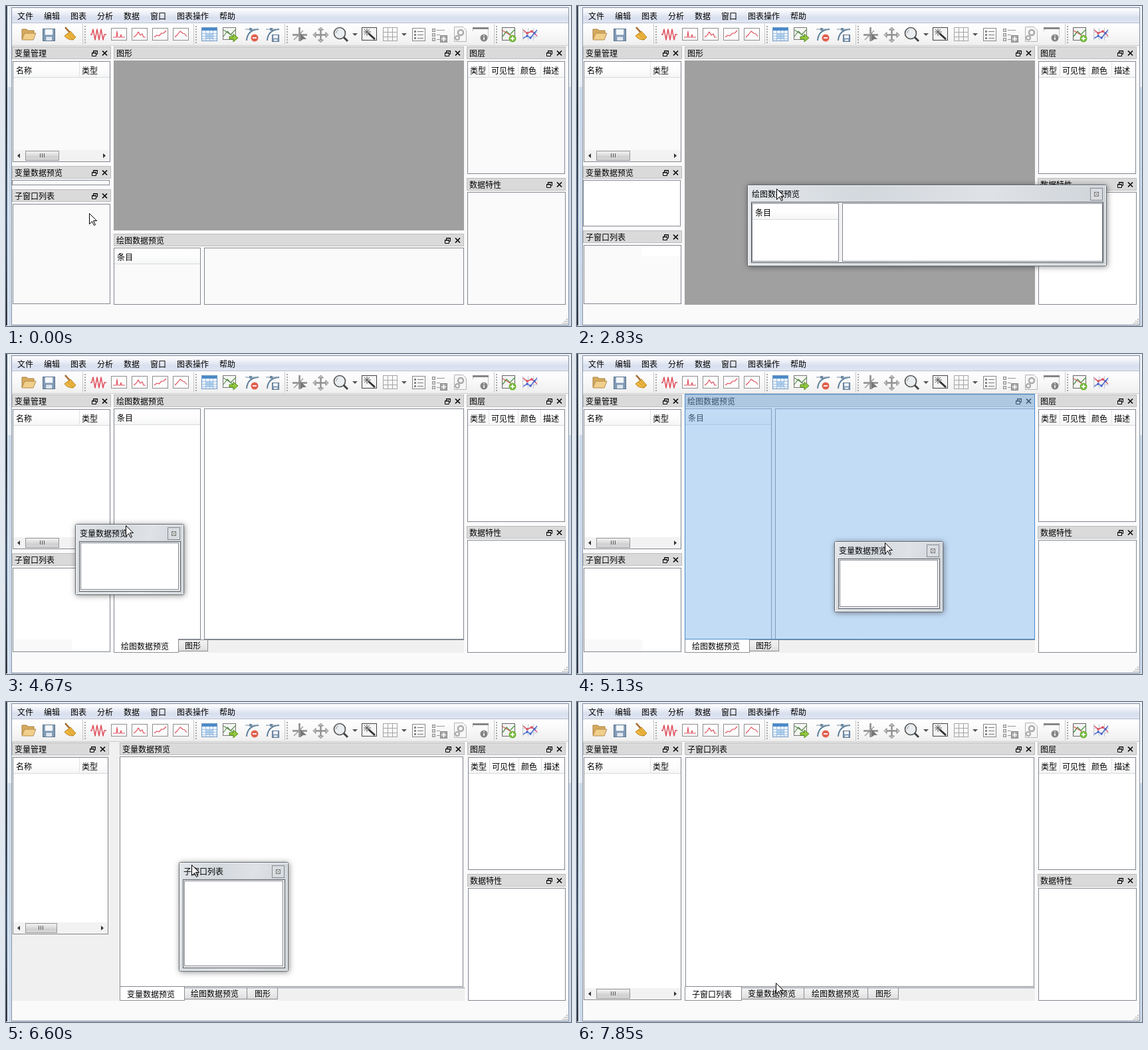
An HTML page with a canvas that plays this animation: 850 by 482 pixels, repeating every 8000 ms.

```html
<!DOCTYPE html>
<html lang="zh">
<head>
<meta charset="utf-8">
<style>
html, body { margin: 0; width: 100%; height: 100%; overflow: hidden; background: #fafafa; }
canvas { display: block; width: 850px; height: 482px; }
</style>
</head>
<body>
<canvas id="stage" width="850" height="482"></canvas>
<script>
const ctx = document.getElementById('stage').getContext('2d');
const LOOP = 8000;
const EDGE = '#828790', PALE = '#fafafa', WHITE = '#fff';
const PLOT = '图形', ITEMS = '绘图数据预览', VARS = '变量数据预览', SUBS = '子窗口列表';

// Pointer positions: time, x, y; each one holds until the next.
const pointer = [
  [0, 125, 312], [120, 124, 308], [260, 115, 300], [400, 104, 290], [530, 94, 282], [670, 86, 276],
  [800, 82, 273], [940, 83, 272], [1240, 83, 276], [1380, 83, 290], [1520, 83, 306], [1650, 84, 322],
  [1790, 84, 334], [1930, 130, 350], [2070, 269, 373], [2210, 220, 373], [2370, 206, 349],
  [2680, 225, 330], [2830, 300, 275], [2980, 355, 228], [3910, 300, 232], [4060, 220, 238],
  [4210, 150, 244], [4370, 105, 247], [4520, 89, 247], [4670, 180, 258], [4820, 310, 270],
  [4980, 410, 280], [5130, 463, 284], [5550, 350, 308], [5670, 216, 333], [5820, 110, 326],
  [5940, 50, 318], [6060, 21, 312], [6200, 24, 309], [6330, 28, 305], [6480, 150, 275],
  [6600, 279, 245], [6750, 330, 235], [7450, 325, 300], [7580, 315, 360], [7720, 305, 405], [7850, 299, 423]
];

const within = (t, from, to) => t >= from && t < to;

function rect(x0, y0, x1, y1, fill) {
  ctx.fillStyle = fill;
  ctx.fillRect(x0, y0, x1 - x0, y1 - y0);
}

function box(x0, y0, x1, y1, fill = WHITE, edge = EDGE) {
  rect(x0, y0, x1, y1, edge);
  rect(x0 + 1, y0 + 1, x1 - 1, y1 - 1, fill);
}

function shade(y0, y1, ...colors) {
  const g = ctx.createLinearGradient(0, y0, 0, y1);
  colors.forEach((c, i) => g.addColorStop(i / (colors.length - 1), c));
  return g;
}

function path(d, stroke, width = 1, fill) {
  const p = new Path2D(d);
  if (fill) { ctx.fillStyle = fill; ctx.fill(p); }
  if (stroke) {
    ctx.strokeStyle = stroke;
    ctx.lineWidth = width;
    ctx.lineJoin = 'round';
    ctx.stroke(p);
  }
}

function disc(x, y, r, fill, stroke, width = 1) {
  ctx.beginPath();
  ctx.arc(x, y, r, 0, 7);
  if (fill) { ctx.fillStyle = fill; ctx.fill(); }
  if (stroke) { ctx.strokeStyle = stroke; ctx.lineWidth = width; ctx.stroke(); }
}

function label(text, x, y, color = '#000') {
  ctx.font = '12px "Noto Sans CJK SC", "Noto Sans CJK", sans-serif';
  ctx.textBaseline = 'alphabetic';
  ctx.fillStyle = color;
  ctx.fillText(text, x, y + 4.5);
}

function title(text, x0, y0, x1) {
  box(x0, y0, x1, y0 + 19, '#dadada', '#bcbcbc');
  label(text, x0 + 4, y0 + 10);
  const x = x1 - 29, y = y0 + 6;
  path(`M${x + 2.5} ${y + 3}v-2.5h6v5h-2M${x + 2} ${y + 1}h7M${x + .5} ${y + 3.5}h6v5h-6zM${x} ${y + 4}h7`, '#000');
  path(`M${x1 - 13} ${y + .5}l7 7m0 -7l-7 7`, '#000', 1.6);
}

function header(x0, y0, x1, columns) {
  rect(x0, y0, x1, y0 + 24, shade(y0, y0 + 24, WHITE, '#fdfdfd', '#f4f5f6'));
  rect(x0, y0 + 23, x1, y0 + 24, '#d9dadb');
  columns.forEach(([text, x], i) => {
    label(text, x, y0 + 13);
    if (i) rect(x - 4, y0, x - 3, y0 + 24, '#e1e2e4');
  });
}

function chrome() {
  rect(0, 0, 850, 482, PALE);
  rect(0, 0, 2, 482, shade(0, 482, '#39495b', '#22313f', '#3e5878', '#28333f'));
  rect(2, 0, 8, 122, '#e9eff7');
  rect(2, 122, 8, 482, '#cddbeb');
  rect(2, 0, 3, 482, '#fff');
  rect(847, 0, 850, 122, '#eef3f9');
  rect(847, 122, 850, 482, '#cddbeb');
  rect(8, 2, 9, 481, '#8794a3');
  rect(846, 2, 847, 481, '#8794a3');
  rect(8, 0, 847, 2, '#e9eff7');
  rect(8, 2, 847, 3, '#7e8a98');
  rect(8, 480, 847, 481, '#7e8a98');
  rect(0, 481, 850, 482, '#cddbeb');
  rect(9, 3, 846, 25, shade(3, 25, '#fff', '#eef1f8', '#d8dfee', '#dfe5f2'));
  rect(9, 25, 846, 26, '#b9c0cf');
  [['文件', 17], ['编辑', 57], ['图表', 97], ['分析', 137], ['数据', 177], ['窗口', 217], ['图表操作', 257], ['帮助', 321]]
    .forEach(([text, x]) => label(text, x, 15));
  rect(9, 26, 846, 59, shade(26, 59, '#fff', '#f8f8f8', '#efefef'));
  rect(9, 59, 846, 60, '#c9c9c9');
  for (let i = 0; i < 3; i++)
    for (let j = 0; j <= i; j++) rect(843 - j * 3, 471 + i * 3, 845 - j * 3, 473 + i * 3, '#bdbdbd');
}

function chartIcon(x, line) {
  box(x, 34, x + 24, 53, '#fdfdfd', '#8f8f8f');
  path(`M${x + 3} 48${line}`, '#e0525e', 1.2);
}

function floppy(x, y, s) {
  box(x, y, x + s, y + s, '#7f99b5', '#5a738e');
  rect(x + s * .2, y + 1, x + s * .8, y + s * .5, '#f5f8fb');
  rect(x + s * .28, y + s * .65, x + s * .75, y + s - 1, '#dfe6ed');
}

function badge(x, y, color, plus) {
  disc(x, y, 5.5, color);
  path(`M${x - 3} ${y}h6` + (plus ? `M${x} ${y - 3}v6` : ''), '#fff', 1.8);
}

function toolbar() {
  [115, 282, 419, 734].forEach(x => {
    rect(x, 27, x + 1, 58, '#c8c8c8');
    for (let y = 30; y < 56; y += 4) rect(x + 3, y, x + 5, y + 2, '#a7a7a7');
  });
  ctx.save();
  ctx.translate(0, -1);
  // Files
  path('M24 51V36h7l2 2h9v4', '#a98140', 1, '#d6aa5d');
  path('M24 52l4-10h17l-4 10z', '#b58c4a', 1, '#f0cf8c');
  floppy(55, 35, 19);
  path('M89 33l7 8', '#a3682c', 2.5);
  path('M88 46l9-7 8 9-4 4q-9 0-13-6z', '#b5801f', 1, '#efb840');
  path('M92 43l9 8M95 41l8 8', '#c9902b');
  // Charts
  path('M127 44h2l2-8 3 16 3-16 3 16 3-16 3 16 2-8h3', '#e04a58', 1.4);
  chartIcon(158, 'h5l1-9 1 9h4l1-4 1 4h5');
  chartIcon(189, 'l4-3 3-5 3 5 3-2 2 5h3');
  chartIcon(220, 'l4-3 3 1 4-4 3 0 4-4');
  chartIcon(251, 'l4-4 4-5 4 3 3 1 3 4');
  // Data
  box(294, 33, 318, 54, '#eef5fc', '#6d96c2');
  rect(295, 34, 317, 38, '#4b8ac8');
  rect(301, 43, 312, 50, '#b1d0ee');
  path('M295 42.5h22M295 46.5h22M295 50.5h22M300.5 38v15M306.5 38v15M311.5 38v15', '#9dbfe0');
  box(326, 33, 346, 52, '#f4f6f2', '#777');
  path('M327 47l6-8 5 5 8-8M327 37l8 5 10 7', '#5c8a51', 1.2);
  path('M336 47h6v-4l7 6-7 6v-4h-6z', '#558b1d', 1, '#92c83e');
  [360, 391].forEach(x => {
    path(`M${x + 2} 53q1-16 18-17`, '#5d7f9b', 2);
    path(`M${x} 36h18`, '#93a7b7', 1.3);
    rect(x + 6, 34, x + 10, 38, '#6f8ba2');
  });
  badge(374, 49, '#e2604e');
  floppy(400, 44, 11);
  // Plot tools
  path('M441.5 33v21M431 44.5h22', '#8b8b8b', 2.5);
  path('M433 52l14-14', '#999', 1.5);
  path('M443 42l9 9-5 0-4 3z', null, 0, '#777');
  path('M473.5 36v16M465 44.5h17', '#929292', 2.5);
  path('M473.5 33l4 4h-8zM473.5 56l4-4h-8zM462 44.5l4-4v8zM485 44.5l-4-4v8z', '#858585', 1, '#c5c5c5');
  disc(502, 42, 8.5, '#e9edef', '#555', 1.7);
  path('M508 48l6 6', '#444', 3);
  path('M500 37q-3 1-3 5', '#aaa', 1.3);
  [525, 599].forEach(x => path(`M${x - 4} 42h8l-4 4z`, null, 0, '#555'));
  box(535, 33, 558, 53, '#f4f4f4', '#444');
  path('M545 42l10 9', '#333', 3);
  path('M543 35v11M538 40h11M539 36l8 8M547 36l-8 8', '#555');
  path('M567.5 33v21M574.5 33v21M581.5 33v21M588.5 33v21M567 33.5h22M567 40.5h22M567 47.5h22M567 53.5h22', '#a5a5a5');
  box(611, 34, 631, 54, '#fafafa', '#888');
  [39, 44, 49].forEach(y => {
    rect(614, y - 1, 617, y + 2, '#888');
    rect(619, y, 628, y + 1, '#777');
  });
  [35, 42, 49].forEach((y, i) => {
    box(641, y, 646, y + 5, '#ddd', '#8d8d8d');
    rect(648, y + 2, i ? 653 : 660, y + 3, '#999');
  });
  box(653, 45, 664, 56, '#a5a5a5', '#898989');
  path('M655 50.5h7M658.5 47v7', '#fff', 1.6);
  path('M674.5 32.5h13l5 5v17h-18z', '#b4b4b4', 1, '#f6f6f6');
  disc(684, 41, 4, null, '#aaa', 2.5);
  disc(679, 49, 3, null, '#aaa', 2);
  rect(702, 33, 726, 36, '#858585');
  path('M702.5 36v3M725.5 36v12', '#c4c4c4');
  disc(719, 49, 5.5, '#858585');
  path('M719 48v4M719 45v1.5', '#fff', 1.6);
  box(746, 33, 766, 53, '#f4f4f4', '#666');
  path('M747 47l6-8 5 5 8-8', '#4f9546', 1.3);
  path('M747 38l7 4 11 7', '#d05b55', 1.2);
  badge(762, 50, '#74b63b', true);
  path('M777.5 34v19M777 40.5h23M777 47.5h23M785.5 34v19M793.5 34v19', '#c4c8d2');
  path('M778 50l6-4 5 3 10-12', '#4868d0', 1.4);
  path('M778 37l6 5 7-3 8 7', '#d94e5e', 1.4);
  [[784, 46], [789, 49], [795, 42]].forEach(([x, y]) => disc(x, y, 1.8, '#4868d0'));
  [[784, 42], [791, 39]].forEach(([x, y]) => disc(x, y, 1.8, '#d94e5e'));
  ctx.restore();
}

function variablePanel(right, bottom, fill) {
  title('变量管理', 9, 61, right + 1);
  box(10, 83, right, bottom, fill);
  header(11, 84, right - 1, [['名称', 15], ['类型', 114]]);
  const y = bottom - 18, thumb = right - 77;
  rect(11, y, right - 1, y + 17, '#f2f2f2');
  box(29, y + 1, thumb, y + 16, shade(y, y + 16, '#f7f7f7', '#e6e6e6', '#cfcfd0', '#dcdcdc'), '#969696');
  const mid = Math.round((29 + thumb) / 2);
  for (let i = -4; i < 4; i += 3) rect(mid + i, y + 5, mid + i + 1, y + 11, '#555');
  path(`M21 ${y + 5}v7l-4-3.5zM${right - 11} ${y + 5}v7l4-3.5z`, null, 0, '#333');
}

function leftColumn(t, py) {
  const fill = t < 4670 ? PALE : WHITE;
  if (t < 4670) {
    const bottom = t < 1240 ? 270 : t < 1790 ? py - 2 : 332;
    variablePanel(157, 235, fill);
    title(VARS, 9, 241, 158);
    box(9, 262, 156, bottom, t < 1240 ? PALE : WHITE);
    title(SUBS, 9, bottom + 6, 158);
    box(10, bottom + 28, 157, 449, PALE);
    if (t >= 1790) rect(97, 362, 156, 377, WHITE);
  } else if (t < 6480) {
    variablePanel(157, 294, fill);
    title(SUBS, 9, 300, 158);
    box(10, 322, 157, 449);
    rect(11, 430, 99, 448, '#f9f9f9');
  } else if (t < 6750) {
    rect(9, 60, 171, 450, '#f0f0f0');
    variablePanel(154, t < 6600 ? 312 : 350, fill);
  } else variablePanel(157, 449, fill);
}

function rightColumn(t) {
  const fill = t < 2680 ? PALE : WHITE, dx = within(t, 6480, 6750) ? 1 : 0;
  title('图层', 693 + dx, 61, 842);
  box(694 + dx, 83, 841, 253, fill);
  header(695 + dx, 84, 840, [['类型', 698 + dx], ['可见性', 730 + dx], ['颜色', 774 + dx], ['描述', 808 + dx]]);
  title('数据特性', 693 + dx, 259, 842);
  box(694 + dx, 280, 842, 450, fill);
}

function itemBoxes(x0, y0, x1, y1, fill) {
  box(x0, y0, x0 + 131, y1, fill);
  header(x0 + 1, y0 + 1, x0 + 130, [['条目', x0 + 5]]);
  box(x0 + 136, y0, x1, y1, fill);
}

function tabs(x, right, names) {
  rect(x, 430, right, 450, '#f0f0f0');
  rect(x, 430, right, 431, EDGE);
  names.forEach((name, i) => {
    // The front tab overlaps its neighbour; the last one is a little narrower.
    const inset = i === 1 ? 9 : 11;
    const last = i === names.length - 1 ? 2 : 0;
    const w = name.length * 12 + (i === 1 ? 22 : i ? 24 : 26) - last;
    if (i) box(x - 1, 430, x + w, 448, shade(430, 448, '#f3f3f3', '#ebebeb', '#dcdcdc'), '#8c8e94');
    else {
      box(x, 429, x + w, 450, WHITE, '#8c8e94');
      rect(x + 1, 429, x + w - 1, 431, WHITE);
    }
    label(name, x + inset, i ? 439 : 440);
    x += w;
  });
}

function center(t) {
  const shifted = within(t, 6480, 6750), x = shifted ? 171 : 162, right = shifted ? 690 : 689;
  const names = [PLOT];
  if (t >= 3760) names.unshift(ITEMS);
  if (t >= 5430) names.unshift(VARS);
  if (t >= 7310) names.unshift(SUBS);
  const front = names[0];
  title(front, x, 61, right);
  if (front === PLOT) {
    const bottom = t < 2680 ? 338 : t < 2830 ? 390 : t < 2980 ? 450 : 430;
    rect(162, 82, 689, bottom, '#a0a0a0');
  } else if (front === ITEMS) itemBoxes(162, 82, 689, 430, WHITE);
  else if (front === VARS) box(x, 82, right - 2, 429);
  else box(163, 83, 688, 429);
  if (t < 2680) {
    title(ITEMS, 162, 343, 689);
    itemBoxes(162, 364, 689, 450, PALE);
    if (t >= 2210) rect(206, 375, 275, 388, '#f5f5f5');
  }
  if (t >= 2980) tabs(x, right, names);
  if (within(t, 2980, 3760) || within(t, 5130, 5430) || within(t, 6750, 7310)) {
    rect(162, 60, 689, 430, 'rgba(124,180,236,.46)');
    ctx.strokeStyle = '#478bca';
    ctx.lineWidth = 1;
    ctx.strokeRect(162.5, 60.5, 526, 369);
  }
}

function floating(text, x, y, w, h, stretched) {
  const r = x + w, b = y + h;
  ctx.save();
  ctx.shadowColor = 'rgba(0,0,0,.45)';
  ctx.shadowBlur = 8;
  ctx.shadowOffsetX = ctx.shadowOffsetY = 1;
  ctx.beginPath();
  ctx.roundRect(x, y, w, h, 3);
  ctx.fillStyle = '#62676d';
  ctx.fill();
  ctx.restore();
  const glass = ctx.createLinearGradient(x, y, r, y + 40);
  ['#e3e6ea', '#d3d8dd', '#dfe2e6', '#cfd4d9'].forEach((c, i) => glass.addColorStop(i / 3, c));
  box(x + 1, y + 1, r - 1, b - 1, glass, '#f2f4f6');
  label(text, x + 7, y + 14);
  box(r - 25, y + 5, r - 6, y + 24, '#d9dde1', '#858a91');
  box(r - 19, y + 11, r - 12, y + 18, '#f4f4f4', '#777');
  path(`M${r - 17.5} ${y + 12.5}l4 4m0 -4l-4 4`, '#666');
  box(x + 6, y + 26, r - 5, b - 5, '#f2f2f2', '#555a60');
  if (text === ITEMS) {
    itemBoxes(x + 7, y + 28, r - 6, b - 7, WHITE);
    if (stretched) {
      rect(x + 7, b - 33, x + 138, b - 7, EDGE);
      rect(x + 143, b - 33, r - 6, b - 7, EDGE);
    }
  } else box(x + 8, y + 28, r - 8, b - 8);
}

function floatingPanels(t, x, y) {
  if (within(t, 2680, 3610)) floating(ITEMS, x - 44, y - 6, 541, 123);
  if (within(t, 3610, 3760)) floating(ITEMS, 180, 83, 541, 340, true);
  if (within(t, 4670, 5430)) floating(VARS, x - 76, y - 2, 164, 107);
  if (within(t, 6480, 7160)) floating(SUBS, x - 19, y - 4, 165, 165);
  if (within(t, 7160, 7310)) floating(SUBS, 157, 61, 534, 384);
}

function drawPointer(t, x, y) {
  if (within(t, 800, 1930)) {
    path(`M${x - 6} ${y - 1.5}h13M${x - 6} ${y + 1.5}h13M${x + .5} ${y - 2}v-6M${x + .5} ${y + 2}v6`, '#000');
    path(`M${x + .5} ${y - 10}l3 4h-6zM${x + .5} ${y + 10}l3-4h-6z`, null, 0, '#000');
  } else {
    path(`M${x + .5} ${y + .5}v16l4-4 3 6 2-1-3-6h5z`, '#000', 1, '#fff');
  }
}

function draw(t) {
  const [, x, y] = pointer.findLast(step => step[0] <= t);
  chrome();
  toolbar();
  leftColumn(t, y);
  rightColumn(t);
  center(t);
  floatingPanels(t, x, y);
  drawPointer(t, x, y);
}

const start = performance.now();
function tick() {
  draw((performance.now() - start) % LOOP);
  requestAnimationFrame(tick);
}
tick();
</script>
</body>
</html>
```
